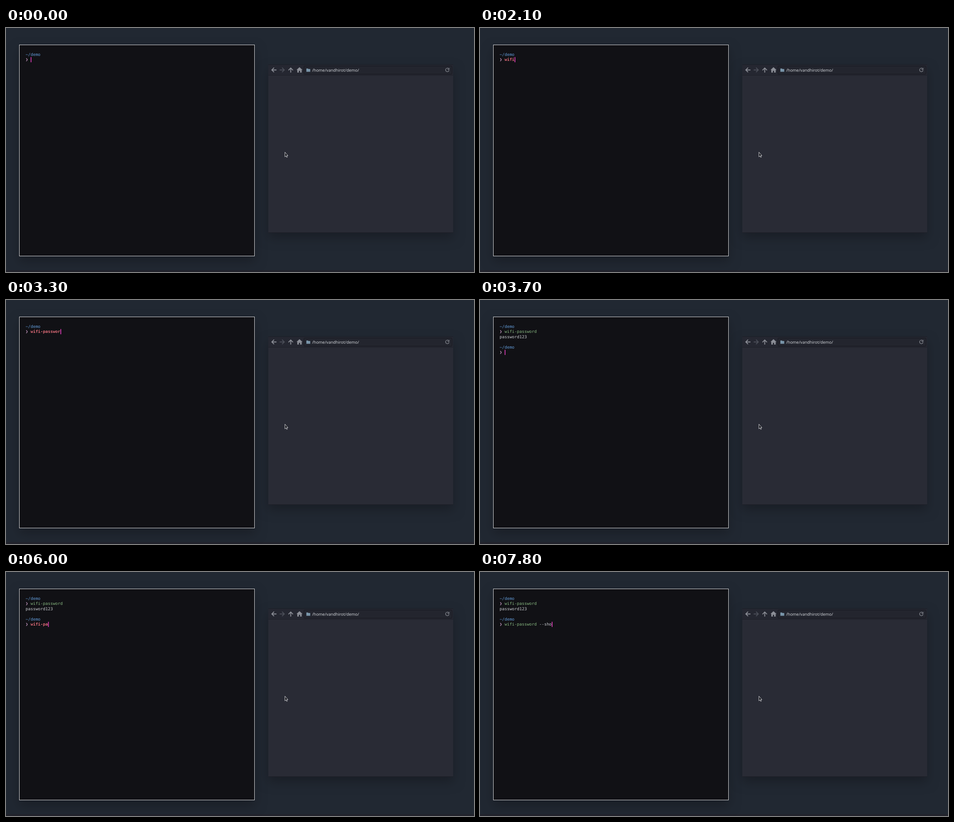
An HTML page that plays this animation: 1033 px wide and 542 px high, repeating every 8 s.

```html
<!DOCTYPE html>
<html lang="en">
<head>
<meta charset="utf-8">
<title>Terminal demo</title>
<style>
  html, body { margin: 0; width: 100%; height: 100%; overflow: hidden; background: #212832; }
  svg { display: block; width: 100%; height: 100%; }
  text { white-space: pre; text-rendering: geometricPrecision; }
  #terminal text { font: 9.08px "DejaVu Sans Mono", monospace; fill: #c9ccd0; }
  #terminal .dir { fill: #629bd8; }
  #terminal .prompt { fill: #d3a3cf; }
  #terminal .valid { fill: #88b981; }
  #terminal .invalid { fill: #e06c78; font-weight: bold; }
  .path { font: 9.05px "Noto Sans", sans-serif; fill: #cdd0d5; }
  .shadow { filter: drop-shadow(0 11px 12px rgba(18, 20, 26, .5)); }
  .icon { fill: none; stroke: #8b8e96; stroke-width: 1.9; }
</style>
</head>
<body>
<svg viewBox="0 0 1033 542">
  <rect width="1033" height="542" fill="#212832"/>
  <rect y="538" width="1033" height="4" fill="#22232c"/>

  <rect class="shadow" x="29.5" y="37.5" width="519" height="469" fill="#111115" stroke="#d6d7d9"/>
  <g id="terminal"></g>

  <rect class="shadow" x="579" y="82" width="408" height="373" fill="#292b35"/>
  <rect x="579" y="82" width="408" height="23" fill="#252731"/>
  <path d="M579 81.5H987M579 105H987M579 454.5H987" stroke="#1c1e26"/>
  <rect x="657.5" y="84.5" width="327" height="18" rx="2" fill="#23252e" stroke="#17181f"/>
  <g class="icon">
    <path d="M597 93.2H587M591.7 88.2L586.7 93.2L591.7 98.2"/>
    <path d="M604 93.2H614M609.3 88.2L614.3 93.2L609.3 98.2" stroke="#4b4e58"/>
    <path d="M628.5 99V89M623.5 93.8L628.5 88.8L633.5 93.8"/>
    <path d="M976.8 90.2A3.9 3.9 0 1 0 978 94M978 88.8V92.2H974.5" stroke-width="1.2"/>
  </g>
  <path d="M647.8 87L654.5 93.3H652.6V99H649.2V95H646.4V99H643V93.3H641.1Z" fill="#8b8e96"/>
  <path d="M663 90H666.5L667.5 91H671.5V97.3H663Z" fill="#7894a8"/>
  <text class="path" x="675.7" y="96.7">/home/vandhirot/demo/</text>

  <path d="M615.7 275.8V286.2L618 284.1L619.6 287.4L621 286.7L619.5 283.5H622.3Z"
        fill="#15161b" stroke="#e3e4e6" stroke-width=".9"/>
</svg>
<script>
  const LOOP = 8000, TICK = 100, KEY_GAP = 150;
  const FIRST_KEY = 1600, ENTER = 3600, OUTPUT = 3700, SECOND_KEY = 5100;
  const LEFT = 43.3, COLUMN = 5.467, BASELINE = 61.8, LINE = 11.5;
  const COMMAND = "wifi-password";
  const terminal = document.getElementById("terminal");

  const textAt = (row, column, className, content) =>
    `<text class="${className}" x="${LEFT + column * COLUMN}" y="${BASELINE + row * LINE}">${content}</text>`;

  const cursorAt = (row, column) =>
    `<rect x="${LEFT + .3 + column * COLUMN}" y="${BASELINE - 8.7 + row * LINE}" width="1.6" height="${LINE}" fill="#e83fc0"/>`;

  const keysTyped = (time, start) =>
    time < start ? 0 : Math.floor((time - start) / KEY_GAP) + 1;

  function promptBlock(row, typed) {
    const name = typed.slice(0, COMMAND.length);
    const valid = name === "w" || name === COMMAND;
    return textAt(row, 0, "dir", "~/demo") +
      textAt(row + 1, 0, "prompt", "❯") +
      textAt(row + 1, 2, valid ? "valid" : "invalid", name) +
      textAt(row + 1, 2 + COMMAND.length, "", typed.slice(COMMAND.length));
  }

  function cursorVisible(time) {
    const blinkStart = time < FIRST_KEY ? 0 : ENTER;
    const typing = time >= SECOND_KEY || (time >= FIRST_KEY && time < ENTER);
    return typing || Math.floor((time - blinkStart) / 500) % 2 === 0;
  }

  function render(elapsed) {
    const time = Math.floor(elapsed % LOOP / TICK) * TICK;
    const first = COMMAND.slice(0, keysTyped(time, FIRST_KEY));
    let scene = promptBlock(0, first);
    let row = 1, column = 2 + first.length;
    if (time >= ENTER) [row, column] = [2, 0];
    if (time >= OUTPUT) {
      const second = (COMMAND + " --show").slice(0, keysTyped(time, SECOND_KEY));
      scene += textAt(2, 0, "", "password123") + promptBlock(4, second);
      [row, column] = [5, 2 + second.length];
    }
    if (cursorVisible(time)) scene += cursorAt(row, column);
    terminal.innerHTML = scene;
  }

  const start = performance.now();
  function frame() {
    render(performance.now() - start);
    requestAnimationFrame(frame);
  }
  frame();
</script>
</body>
</html>
```
